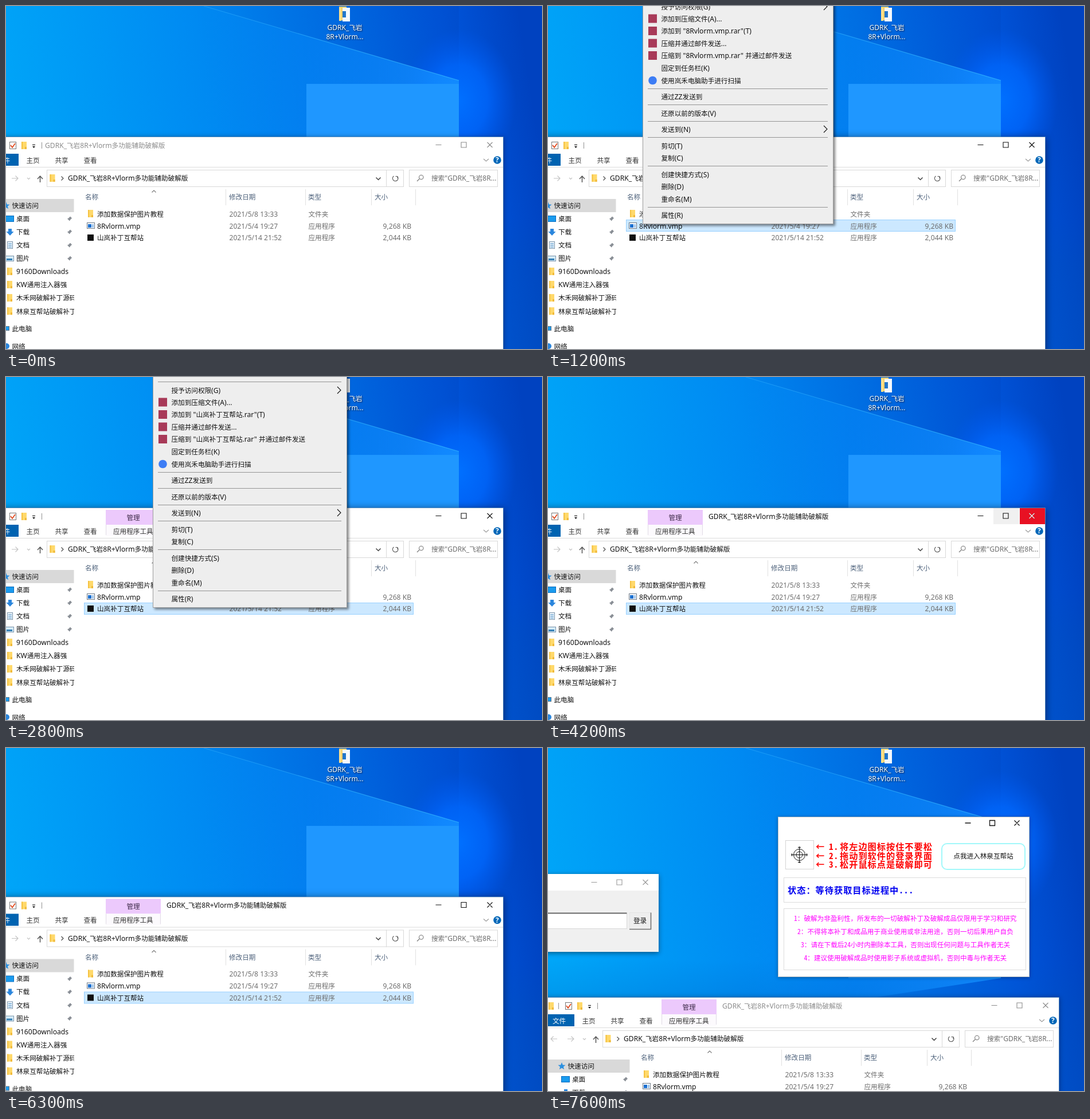
These frames come from a looping animation (935x599 px, 8 s). An HTML page:

```html
<!DOCTYPE html>
<html lang="zh-CN">
<head>
<meta charset="utf-8">
<title>Desktop</title>
<style>
  html, body { margin: 0; width: 100%; height: 100%; overflow: hidden; background: #0078e8; }
  svg { display: block; width: 935px; height: 599px; }
  text { font-family: "Noto Sans", "Noto Sans CJK SC", "Noto Sans CJK", sans-serif; font-size: 11.6px; white-space: pre; }
  .latin { font-size: 12.1px; }
  .song { font-family: "Noto Sans Mono CJK SC", "Noto Sans CJK SC", "Noto Sans CJK", monospace; }
  .line { fill: none; stroke-width: 1.1; }
</style>
</head>
<body>
<svg id="stage" viewBox="0 0 935 599" xmlns="http://www.w3.org/2000/svg"></svg>
<script>
const GRAY = '#6d6d6d', INK = '#111', HEAD = '#4c607a';
const APP = 'GDRK_飞岩8R+Vlorm多功能辅助破解版';
const EXE = '8Rvlorm.vmp', PATCH = '山岚补丁互帮站';

const rect = (x, y, w, h, fill, extra = '') =>
  `<rect x="${x}" y="${y}" width="${w}" height="${h}" fill="${fill}" ${extra}/>`;
const box = (x, y, w, h, fill, stroke) => rect(x + .5, y + .5, w, h, fill, `stroke="${stroke}"`);
const line = (d, stroke = '#444', extra = '') => `<path class="line" d="${d}" stroke="${stroke}" ${extra}/>`;
const group = (id, body, extra = '') => `<g id="${id}" ${extra}>${body}</g>`;

// y is the vertical middle of the text; Latin runs are set slightly larger than the ideographs
function text(x, y, str, fill = INK, extra = '') {
  const body = str.replace(/[\x20-\x7e]+/g, run => `<tspan class="latin">${run}</tspan>`);
  return `<text x="${x}" y="${y + 4.3}" fill="${fill}" ${extra}>${body}</text>`;
}
const song = (x, y, str, fill, size, style = '') =>
  `<text class="song" x="${x}" y="${y + size * .37}" fill="${fill}" style="font-size:${size}px;${style}">${str}</text>`;
const BOLD = 'font-weight:700;letter-spacing:1px';

const folder = (x, y) => rect(x, y, 9, 13, '#ffd96b') + rect(x, y, 2, 13, '#f5c242') + rect(x + 6, y + 9, 3, 4, '#f0b93a');
const exeIcon = (x, y) => box(x, y, 13, 10, '#fff', '#6b7785') + rect(x + 2, y + 3, 6, 6, '#1a6fd0') + rect(x + 9, y + 3, 3, 6, '#9cc4ec');
const pin = y => `<path d="M106 ${y + 5}l3-3-2-2 2-1 3-3 3 3-3 3-1 2-2-2z" fill="#8a8f96"/>`;
const winButtons = (x, y, stroke) =>
  line(`M${x} ${y}h10M${x + 44.5} ${y - 4.5}h9v9h-9zM${x + 90} ${y - 4.5}l9 9m0-9l-9 9`, stroke);

function wallpaper() {
  const gradient = (id, stops, attrs = '') => `<linearGradient id="${id}" ${attrs}>` +
    stops.map(([at, color, opacity = 1]) => `<stop offset="${at}" stop-color="${color}" stop-opacity="${opacity}"/>`).join('') +
    '</linearGradient>';
  return '<defs>' +
    gradient('sky', [[0, '#00a6f8'], [.4, '#008af2'], [.65, '#0072e8'], [.85, '#0056dc'], [1, '#0042c0']], 'x1="0" y1=".55" x2="1" y2=".45"') +
    gradient('shade', [[0, '#0050c0', .05], [1, '#0046c0', .3]]) +
    gradient('beam', [[0, '#0a98ff', 0], [.4, '#0a90ff', .25], [1, '#1690ff', .85]]) +
    gradient('floor', [[0, '#0050b0', 0], [.35, '#0050b0', .2], [1, '#0050b0', .3]], 'x1="0" y1="0" x2="0" y2="1"') +
    gradient('ray', [[0, '#35b2ff', .45], [1, '#35b8ff', .75]]) +
    `<radialGradient id="glow"><stop offset="0" stop-color="#0070ff"/><stop offset=".5" stop-color="#0068ff" stop-opacity=".75"/>
      <stop offset="1" stop-color="#0058f0" stop-opacity="0"/></radialGradient></defs>` +
    rect(0, 0, 935, 599, 'url(#sky)') +
    rect(0, 370, 935, 229, 'url(#floor)') +
    '<path d="M345 0L790 130V0z" fill="url(#shade)"/>' +
    '<ellipse cx="790" cy="165" rx="100" ry="125" fill="url(#glow)"/>' +
    '<path d="M345 0L790 130V402L345 470z" fill="url(#beam)"/>' +
    line('M345 0L790 130', 'url(#ray)') +
    rect(524, 136, 266, 266, '#1f97ff') +
    rect(581, 1, 13, 24, '#f6cf68') + rect(587, 3, 13, 24, '#f4f8fc') + rect(587, 9, 6, 11, '#2277cc') +
    rect(581, 3, 4, 23, '#ffe08a') +
    '<g text-anchor="middle" style="filter:drop-shadow(1px 1px 1px #000c)">' +
    text(591, 38, 'GDRK_飞岩', '#fff') + text(591, 54, '8R+Vlorm...', '#fff') + '</g>';
}

function navPane() {
  const pinned = ['桌面', '下载', '文档', '图片'];
  const folders = ['9160Downloads', 'KW通用注入器强', '木禾网破解补丁源码', '林泉互帮站破解补丁'];
  let out = rect(-24, 337, 142.5, 23, '#d9d9d9') +
    '<path d="M0 342l1.8 4.4 4.7.3-3.6 3 1.2 4.6-4.1-2.5-4.1 2.5 1.2-4.6-3.6-3 4.7-.3z" fill="#2b8fe0"/>' +
    text(10.5, 348.5, '快速访问');
  [...pinned, ...folders].forEach((name, i) => {
    const y = 371.5 + i * 23.1;
    out += text(18, y, name) + (i < 4 ? pin(y) : folder(2, y - 7));
  });
  return `<clipPath id="nav"><rect x="-60" y="330" width="179" height="300"/></clipPath><g clip-path="url(#nav)">` + out +
    box(-1, 366, 14, 10, '#1a9bee', '#0a6cc0') +
    '<path d="M4 389h6v5h3.500l-6.500 7-6.500-7H4z" fill="#2b86dd"/>' +
    box(2, 411, 9, 12, '#eef5fb', '#7c95ab') + line('M4 415h6m-6 3h6m-6 3h6', '#3d88c4') +
    box(-1, 436, 14, 9, '#d5ebf8', '#7c95ab') + rect(1, 441, 10, 3, '#347fb5') +
    box(-4, 559, 9, 7, '#1a9bee', '#678') + text(10.5, 564, '此电脑') +
    '<circle cx="1" cy="594" r="5" fill="#2b86dd"/>' + text(10.5, 594.5, '网络') + '</g>';
}

function fileRows() {
  const rows = [
    ['添加数据保护图片教程', '2021/5/8 13:33', '文件夹', ''],
    [EXE, '2021/5/4 19:27', '应用程序', '9,268 KB'],
    [PATCH, '2021/5/14 21:52', '应用程序', '2,044 KB']];
  return group('row2', box(136, 373, 574, 20, 'inherit', 'inherit')) +
    group('row3', box(136, 394, 574, 20, 'inherit', 'inherit')) +
    rows.map(([name, date, kind, size], i) => {
      const y = 363.5 + i * 20.8;
      return text(159, y, name) + text(389.5, y, date, GRAY) + text(527.5, y, kind, GRAY) +
        text(707, y, size, GRAY, 'text-anchor="end"');
    }).join('') +
    folder(143, 356) + exeIcon(141, 378) + rect(142, 399, 11, 11, '#111');
}

function explorer() {
  const headers = [[138, '名称'], [389, '修改日期'], [527, '类型'], [643, '大小']];
  const tabs = [[35.5, '主页'], [85.5, '共享'], [135.5, '查看']];
  return rect(-60, 228.5, 927.5, 500, '#fff', 'id="frame" stroke="#3f78b0" stroke-opacity=".75"') +
    folder(-23, 237) + line('M-5.500 238v11M62.500 238v11', '#999') +
    box(6, 237, 11, 12, '#fff', '#777') + line('M8 243l3 4 5-7', '#e04a1f', 'style="stroke-width:1.8"') +
    folder(27, 237) + line('M46 242.500h5', INK) + '<path d="M46 245h5l-2.500 3z" fill="#111"/>' +
    text(68, 243.5, APP, '#8c8c8c', 'id="plainTitle"') +
    group('tools', rect(174, 232, 96, 26, '#ecc9fc') + rect(174, 258, 96, 20, '#fcfafd') +
      line('M174.500 258v18M269.500 258v18', '#e2dce6') +
      text(222, 245.5, '管理', '#3d2a48', 'text-anchor="middle"') + text(187, 269.5, '应用程序工具', '#333') +
      text(280, 243.5, APP, 'inherit')) +
    rect(732, 229, 45, 28, '#e5e5e5', 'id="minHover"') + rect(777, 229, 45, 28, '#f0f0f0', 'id="maxHover"') +
    rect(823, 229, 44, 28, '#e81123', 'id="closeHover"') +
    group('buttons', winButtons(749.5, 242.5, 'inherit')) + line('M839.500 238l9 9m0-9l-9 9', '#fff', 'id="closeMark"') +
    rect(-24, 258, 46, 21, '#0063b1') + text(-16, 269.5, '文件', '#fff') +
    tabs.map(([x, s]) => text(x, 269.5, s, '#333')).join('') +
    line('M833 267l4.500 4 4.500-4', '#999') + '<circle cx="857" cy="269" r="6.800" fill="#0067b8"/>' +
    text(857, 269, '?', '#fff', 'text-anchor="middle" font-weight="700"') +
    line('M-60 281.500H867', '#dcdcdc') +
    line('M-8 301h-11m4.500-4.500l-4.500 4.500 4.500 4.500M10 301h11m-4.500-4.500l4.500 4.500-4.500 4.500M37 300l2.500 2.500 2.500-2.500', '#c2c2c2') +
    line('M59.500 308v-11m-4.500 5l4.500-5 4.500 5', '#555', 'style="stroke-width:1.5"') +
    box(71, 286, 592, 29, '#fff', '#d9d9d9') + box(663, 286, 30, 29, '#fff', '#d9d9d9') + box(703, 286, 154, 29, '#fff', '#d9d9d9') +
    folder(76.5, 294) + line('M96.500 297.500l3.500 3.500-3.500 3.500') + text(108, 301, APP) +
    line('M645.500 299.500l4 4 4-4', '#444', 'style="stroke-width:1.5"') +
    line('M682.500 297.500a4.800 4.800 0 1 1-6-.5M679.500 297.500h3.500v3.500', '#555') +
    line('M721 302l-4 4M728 299a3.700 3.700 0 1 1-7.400 0a3.700 3.700 0 1 1 7.400 0', '#777') +
    text(742, 301, '搜索"GDRK_飞岩8R...', GRAY) +
    line('M383.500 320v28M522.500 320v28M637.500 320v28M714.500 320v28', '#e2e2e2') +
    line('M254.500 325.500l3.500-3.500 3.500 3.500', '#777') +
    headers.map(([x, s]) => text(x, 334, s, HEAD)).join('') + fileRows() + navPane();
}

// Context menu laid out from its left edge; both menus share one vertical rhythm
function menu(id, x, dy, w, name) {
  const items = [[1.5, '授予访问权限(G)'], [22.5, '添加到压缩文件(A)...'], [44, `添加到 "${name}.rar"(T)`], [65.5, '压缩并通过邮件发送...'],
    [87, `压缩到 "${name}.rar" 并通过邮件发送`], [109, '固定到任务栏(K)'], [130.5, '使用岚禾电脑助手进行扫描'], [159, '通过ZZ发送到'],
    [187.5, '还原以前的版本(V)'], [216, '发送到(N)'], [244.5, '剪切(T)'], [266, '复制(C)'], [294.5, '创建快捷方式(S)'],
    [316, '删除(D)'], [337.5, '重命名(M)'], [366, '属性(R)']];
  const body = box(0, -40, w - 1, 420, '#eee', '#a0a0a0') +
    [-13.5, 144, 172.5, 201, 229.5, 279.5, 351].map(y => line(`M9 ${Math.floor(y) + .5}H${w - 10}`, '#949494')).join('') +
    items.map(([y, s]) => text(32.5, y, s)).join('') +
    [22, 43.5, 65, 86.5].map(y => rect(10, y - 7.5, 15, 15, '#a83a58')).join('') +
    '<circle cx="17.500" cy="130" r="7.300" fill="#3d7df5"/>' +
    [1, 215].map(y => line(`M${w - 17} ${y - 6}l6 6-6 6`, INK)).join('');
  return group(id, `<g transform="translate(${x} ${dy})" style="filter:drop-shadow(3px 3px 2px #0007)">${body}</g>`);
}

function patcher() {
  const notes = [[28, '1：破解为非盈利性，所发布的一切破解补丁及破解成品仅限用于学习和研究'], [34, '2：不得将本补丁和成品用于商业使用或非法用途，否则一切后果用户自负'],
    [40, '3：请在下载后24小时内删除本工具，否则出现任何问题与工具作者无关'], [45.5, '4：建议使用破解成品时使用影子系统或虚拟机，否则中毒与作者无关']];
  const steps = ['将左边图标按住不要松', '拖动到软件的登录界面', '松开鼠标点是破解即可'];
  const ring = r => `M${37.5 - r} 66.500a${r} ${r} 0 1 0 ${2 * r} 0a${r} ${r} 0 1 0 ${-2 * r} 0`;
  return group('patcher', box(0, 0, 438, 279, '#fff', '#b5bcc4') +
    line('M326.500 11h10M369.500 6.500h9v9h-9zM412.500 6.500l9 9m0-9l-9 9', '#111', 'style="stroke-width:1.3"') +
    box(13, 41, 49, 50, '#fff', '#d4d4d4') +
    line(ring(10) + ring(5.5) + 'M23 66.500h29M37.500 52v29M35 53.500h5M35 79.500h5M24.500 64v5M50.500 64v5', '#111', 'style="stroke-width:1"') +
    group('steps', steps.map((s, i) => {
      const y = 52.5 + i * 15.5;
      return song(66, y, '←', '#f00', 15.2, BOLD) + song(89, y, `${i + 1}.`, '#f00', 15.2, BOLD) + song(108, y, s, '#f00', 15.2, BOLD);
    }).join('')) +
    rect(286, 47, 145, 45, '#fff', 'rx="9" stroke="#a2f8fa" stroke-width="2"') +
    text(358.5, 69, '点我进入林泉互帮站', INK, 'text-anchor="middle"') +
    box(10, 106, 422, 43, '#fff', '#dcdcdc') + song(17, 128.5, '状态：等待获取目标进程中...', '#0000f0', 15.2, BOLD) +
    box(10, 160, 422, 107, '#fff', '#dcdcdc') +
    notes.map(([x, s], i) => song(x, 178 + i * 23, s, '#f0f', 11.6)).join(''),
    'style="filter:drop-shadow(0 1px 3px #0005)"');
}

function login() {
  return group('login', rect(-20, 220, 213, 136, '#f0f0f0', 'style="filter:drop-shadow(0 2px 4px #0007)"') +
    rect(-20, 220, 213, 29, '#fff') + winButtons(75.5, 234.5, '#999') +
    box(-20, 288, 157, 27, '#fff', '#d8d8d8') + line('M-20 288.500H137.500', '#696969', 'style="stroke-width:2"') +
    box(142, 287, 37, 29, '#eee', '#e3e3e3') + line('M142 316.500h37.500v-29', '#707070', 'style="stroke-width:1.6"') +
    text(160.5, 301.5, '登录', INK, 'text-anchor="middle"'));
}

const stage = document.getElementById('stage');
stage.innerHTML = wallpaper() + group('explorer', explorer()) + login() + patcher() +
  menu('menu1', 165, 0, 333, EXE) + menu('menu2', 256, 22, 339, PATCH);

const start = { active: 0, tools: 0, row2: 0, row3: 0, menu1: 0, menu2: 0, min: 0, max: 0, close: 0,
  x: 0, y: 0, patcher: 0, px: 86, py: 111, steps: 0, login: 0 };
// Each step: time in ms and what changes then (rows: 1 hover, 2 selected)
const timeline = [
  [400, { active: 1, row2: 1 }], [500, { row2: 2, tools: 1 }],
  [800, { menu1: .25 }], [900, { menu1: .6 }], [1000, { menu1: .85 }], [1100, { menu1: .96 }], [1200, { menu1: 1 }],
  [1700, { menu1: 0 }], [1900, { row3: 1 }], [2200, { row2: 0, row3: 2 }],
  [2600, { menu2: .4 }], [2700, { menu2: .85 }], [2800, { menu2: 1 }], [3400, { menu2: 0 }],
  [3900, { min: 1 }], [4000, { min: 0, max: 1 }], [4200, { close: 1 }],
  [5500, { close: .6, max: .6 }], [5600, { close: .3, max: .3 }], [5700, { close: .1, max: .1 }], [5800, { close: 0, max: 0 }],
  [6300, { y: 31.5 }], [6400, { x: 8, y: 105 }], [6500, { x: 18, y: 175 }], [6600, { x: 24, y: 207, patcher: .6 }],
  [6700, { patcher: 1 }], [6900, { steps: 1 }],
  [7400, { active: 0, px: 200, py: 114, login: .6 }], [7500, { px: 330, py: 118, login: 1 }], [7600, { px: 401, py: 120 }]];

const el = id => document.getElementById(id);
const show = (id, opacity) => { el(id).style.opacity = opacity; };
const rowStyles = [['none', 'none'], ['#e5f3ff', '#e5f3ff'], ['#cce8ff', '#99d1ff']];
function paintRow(id, level) {
  const [fill, stroke] = rowStyles[level];
  el(id).setAttribute('fill', fill);
  el(id).setAttribute('stroke', stroke);
}

function render(t) {
  const s = Object.assign({}, start, ...timeline.filter(([at]) => at <= t).map(([, change]) => change));
  el('explorer').setAttribute('transform', `translate(${s.x} ${s.y})`);
  el('patcher').setAttribute('transform', `translate(${s.px} ${s.py})`);
  el('frame').style.filter = s.active ? 'drop-shadow(0 2px 7px #0008)' : 'drop-shadow(0 1px 4px #0006)';
  el('tools').setAttribute('fill', s.active ? INK : '#8c8c8c');
  el('buttons').setAttribute('stroke', s.active ? INK : '#8c8c8c');
  show('plainTitle', 1 - s.tools);
  show('tools', s.tools);
  paintRow('row2', s.row2);
  paintRow('row3', s.row3);
  show('minHover', s.min);
  show('maxHover', s.max);
  show('closeHover', s.close);
  show('closeMark', s.close);
  for (const id of ['menu1', 'menu2', 'patcher', 'steps', 'login']) show(id, s[id]);
}

const begin = performance.now();
function tick() {
  render((performance.now() - begin) % 8000);
  requestAnimationFrame(tick);
}
tick();
</script>
</body>
</html>
```
